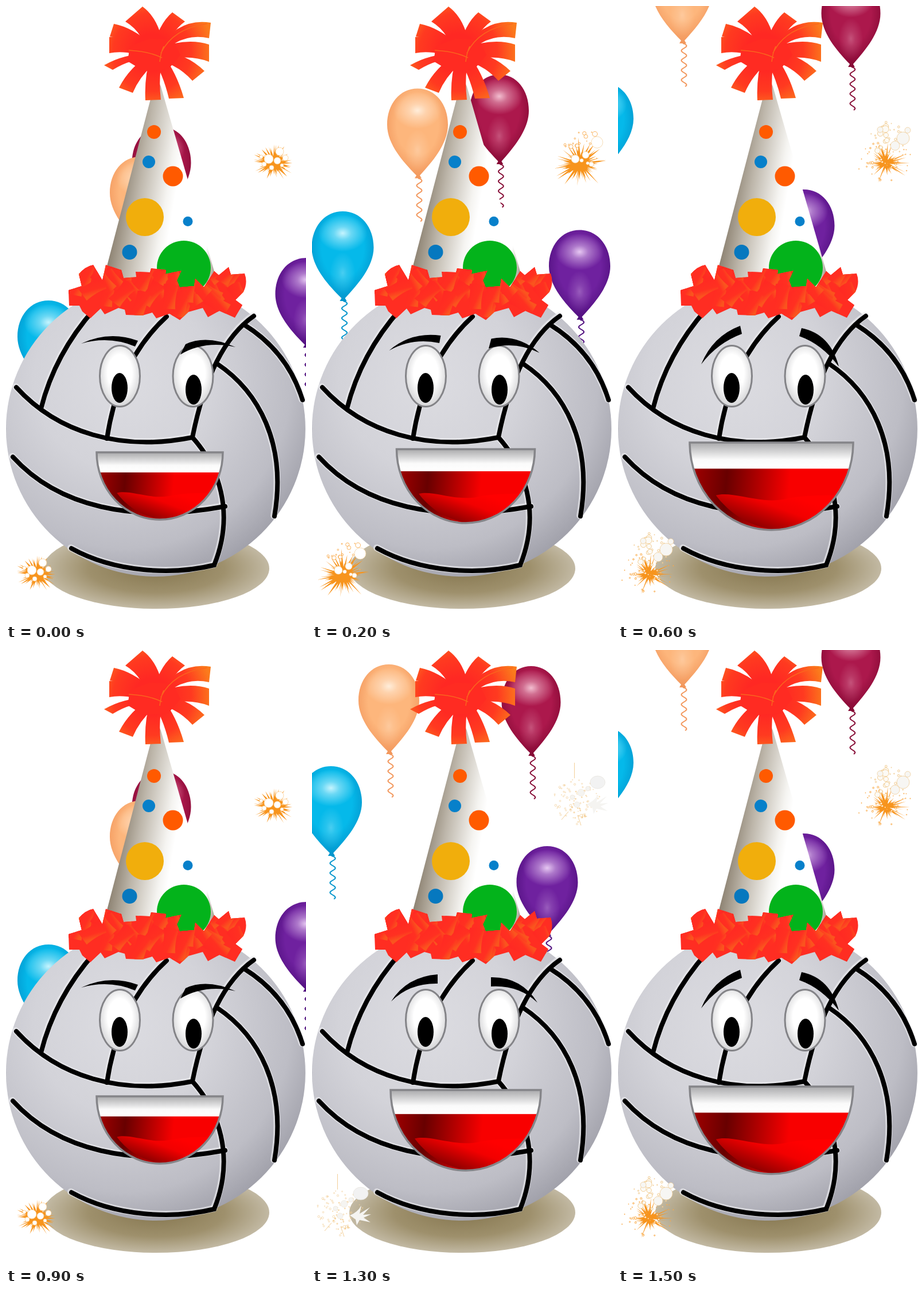
Write an HTML page that moves like this. It is 523 px wide and 1071 px high and loops after 1800 ms.

```html
<!DOCTYPE html>
<html lang="en">
<head>
<meta charset="utf-8">
<title>Party volleyball</title>
<style>
html, body { margin: 0; width: 100%; height: 100%; overflow: hidden; background: #fff; }
svg { display: block; width: 100%; height: 100%; }
</style>
</head>
<body>
<svg id="stage" viewBox="0 0 523 1071" preserveAspectRatio="none">
  <defs>
    <radialGradient id="ball" gradientUnits="userSpaceOnUse" cx="205" cy="650" r="390">
      <stop offset="0" stop-color="#dcdce1"/><stop offset=".4" stop-color="#d3d3d9"/>
      <stop offset=".75" stop-color="#bdbdc5"/><stop offset="1" stop-color="#95959f"/>
    </radialGradient>
    <radialGradient id="shade">
      <stop offset="0" stop-color="#85764f"/><stop offset=".6" stop-color="#9e906c"/><stop offset="1" stop-color="#c2b9a3"/>
    </radialGradient>
    <linearGradient id="cone" gradientUnits="userSpaceOnUse" x1="174" y1="430" x2="366" y2="462">
      <stop offset="0" stop-color="#857a69"/><stop offset=".2" stop-color="#bdb6aa"/>
      <stop offset=".45" stop-color="#f5f4f1"/><stop offset=".53" stop-color="#fff"/>
      <stop offset=".88" stop-color="#fff"/><stop offset="1" stop-color="#9c9283"/>
    </linearGradient>
    <radialGradient id="eye" cx=".5" cy=".45" r=".55">
      <stop offset=".55" stop-color="#fff"/><stop offset="1" stop-color="#d4d4d6"/>
    </radialGradient>
    <radialGradient id="pom" gradientUnits="userSpaceOnUse" cx="255" cy="80" r="105">
      <stop offset=".3" stop-color="#ff2823"/><stop offset=".65" stop-color="#ff3a20"/><stop offset="1" stop-color="#fb7b1c"/>
    </radialGradient>
    <linearGradient id="scrap" x1="0" y1="0" x2="1" y2=".5">
      <stop offset="0" stop-color="#ff2823"/><stop offset=".7" stop-color="#ff3021"/><stop offset="1" stop-color="#fa541e"/>
    </linearGradient>
    <linearGradient id="teeth" x1="0" y1="0" x2="0" y2="1">
      <stop offset="0" stop-color="#a9a9ab"/><stop offset=".65" stop-color="#fafafa"/><stop offset="1" stop-color="#fff"/>
    </linearGradient>
    <linearGradient id="throat" gradientUnits="userSpaceOnUse" x1="5" y1="60" x2="175" y2="75">
      <stop offset="0" stop-color="#a00000"/><stop offset=".35" stop-color="#680000"/><stop offset="1" stop-color="#f80000"/>
    </linearGradient>
    <linearGradient id="tongue" gradientUnits="userSpaceOnUse" x1="170" y1="90" x2="145" y2="156">
      <stop offset="0" stop-color="#ff0000"/><stop offset=".4" stop-color="#f20000"/><stop offset="1" stop-color="#920000"/>
    </linearGradient>
    <clipPath id="lips"><path d="M0 0H287A143.5 154 0 0 1 0 0Z"/></clipPath>
    <clipPath id="fringeClip"><path id="fringeShape"/></clipPath>
  </defs>
  <ellipse cx="262" cy="978" rx="197" ry="70" fill="url(#shade)"/>
  <g id="balloons"></g>
  <ellipse cx="261" cy="735" rx="261" ry="257" fill="url(#ball)"/>
  <g id="seams" fill="none" stroke-linecap="round"></g>
  <path d="M259 135Q265 128 270 140L367 475Q270 520 170 475Z" fill="url(#cone)"/>
  <g id="dots"></g>
  <g id="fringe" clip-path="url(#fringeClip)"></g>
  <g id="pompom" fill="url(#pom)"></g>
  <g id="eyes"></g>
  <path id="browL"/><path id="browR"/>
  <g id="mouth">
    <g clip-path="url(#lips)">
      <rect width="287" height="154" fill="url(#throat)"/>
      <path d="M46 93C75 85 120 108 165 100C205 91 240 94 287 92V154H150C105 148 70 125 46 93Z" fill="url(#tongue)"/>
      <rect width="287" height="46" fill="url(#teeth)"/>
    </g>
    <path d="M0 0H287A143.5 154 0 0 1 0 0Z" fill="none" stroke="#858589" stroke-width="3.5" vector-effect="non-scaling-stroke"/>
  </g>
  <g id="bursts"></g>
</svg>
<script>
const $ = id => document.getElementById(id);

function add(parent, tag, attrs) {
  const el = document.createElementNS('http://www.w3.org/2000/svg', tag);
  for (const k in attrs) el.setAttribute(k, attrs[k]);
  parent.appendChild(el);
  return el;
}

function random(seed) {
  return () => {
    seed = (seed * 16807) % 2147483647;
    return seed / 2147483647;
  };
}

// Four poses; the second lies halfway between the first and the third.
const poses = (a, c, d) => [a, a.map((v, i) => (v + c[i]) / 2), c, d];

function gradient(id, attrs, stops) {
  const g = add(document.querySelector('defs'), 'radialGradient', { id, ...attrs });
  for (const [offset, color, opacity = 1] of stops)
    add(g, 'stop', { offset, 'stop-color': color, 'stop-opacity': opacity });
}

// Balloons: local origin is the top centre
const bag = 'M0 0C31 0 53 27 53 63C53 96 26 127 4 151L7 156H-5L-2 151C-26 127 -53 96 -53 63C-53 27 -31 0 0 0Z';
let curl = 'M1 156';
for (let y = 157; y <= 231; y++)
  curl += `L${(3 + 4.5 * Math.sin((y - 156) / 2.7)).toFixed(1)} ${y}`;

function balloon(name, light, mid, edge, width, places) {
  gradient(name, { cx: .5, cy: .4, r: .62 }, [[0, mid], [.55, mid], [.95, edge], [1, edge]]);
  gradient(name + 'Shine', {}, [[0, light, .95], [.35, light, .5], [1, light, 0]]);
  const g = add($('balloons'), 'g', {});
  const body = add(g, 'g', { transform: `scale(${width / 106} 1)` });
  add(body, 'path', { d: curl, fill: 'none', stroke: edge, 'stroke-width': 2 });
  add(body, 'path', { d: bag, fill: `url(#${name})` });
  const shine = `url(#${name}Shine)`;
  add(body, 'ellipse', { cx: 0, cy: 38, rx: 42, ry: 32, fill: shine });
  add(body, 'ellipse', { cx: 0, cy: 107, rx: 22, ry: 36, fill: shine, opacity: .35 });
  return { g, places };
}

const balloons = [
  balloon('crimson', '#f6c6d6', '#ac184c', '#850934', 103, poses([271, 210], [382, 28], [406, -50])),
  balloon('peach', '#fff0df', '#fdb67c', '#f2975c', 106, poses([234, 262], [134, 25], [112, -91])),
  balloon('sky', '#d0f7ff', '#05b9ea', '#0295cc', 108, poses([74, 512], [33, 202], [-27, 133])),
  balloon('violet', '#ecd0f6', '#6f219f', '#500f7e', 107, poses([523, 438], [410, 341], [324, 319]))
];

// Ball seams
const seams = [
  'M154 527Q85 605 61 700',
  'M18 663C90 742 200 775 325 750',
  'M280 540C225 590 190 660 176 752',
  'M432 539C380 575 345 650 325 750',
  'M415 554C465 585 500 630 517 685',
  'M368 622C440 670 490 760 468 887',
  'M325 750C370 800 400 880 363 972',
  'M12 784C90 870 220 900 382 870',
  'M114 943C190 985 290 990 363 972'
];
for (const d of seams)
  add($('seams'), 'path', { d, stroke: '#ebebef', 'stroke-width': 12, opacity: .65, transform: 'translate(-1 -1)' });
for (const d of seams) add($('seams'), 'path', { d, stroke: '#000', 'stroke-width': 8 });

// Hat dots
for (const [cx, cy, r, fill] of [
  [258, 219, 12, '#ff5a00'], [249, 271, 11, '#0780ca'], [291, 296, 17.5, '#ff5a00'],
  [242, 367, 33, '#f1ae0c'], [317, 374.5, 8.5, '#0780ca'], [215.5, 428, 13, '#0678bf'],
  [310, 455, 47, '#03b31b']
]) add($('dots'), 'circle', { cx, cy, r, fill });

// Fringe: jagged outline filled with overlapping scraps
$('fringeShape').setAttribute('d', `M109 494L132 487L127 466Q138 453 152 450L168 477L174 450L201 459L205 473
L227 471L226 462L251 463L253 456L279 459L278 466L306 460L298 477L303 489L328 487L330 474L345 489
L363 461L371 468L388 454L392 467L416 465Q422 481 414 497L400 511L412 520L399 542L372 530L352 541
L343 525L318 532L303 546L285 535L262 543L255 533L238 538L209 537L207 528L196 525L172 536L165 526
L147 543L133 531L128 521L110 521Z`);
add($('fringe'), 'rect', { x: 105, y: 445, width: 320, height: 105, fill: '#ff2d22' });
const rnd = random(77);
for (let i = 0; i < 36; i++) {
  const x = 112 + (i * 83) % 300, y = 462 + rnd() * 58;
  add($('fringe'), 'path', {
    d: 'M-13 -21Q0 -26 13 -20Q9 0 13 20L-12 22Q-8 0 -13 -21Z', fill: 'url(#scrap)',
    transform: `translate(${x} ${y}) rotate(${rnd() * 120 - 60})`
  });
}

// Pompom ribbons: two outer corners and the bend point
for (const [x1, y1, x2, y2, bx, by] of [
  [208, 27, 238, 1, 255, 35], [290, 11, 312, 27, 276, 38], [180, 82, 180, 54, 215, 62],
  [181, 53, 188, 31, 222, 48], [354, 97, 354, 67, 315, 68], [325, 130, 346, 113, 305, 90],
  [310, 160, 284, 161, 285, 115], [270, 163, 243, 164, 253, 122], [221, 151, 197, 142, 226, 110],
  [186, 111, 171, 103, 215, 85], [354, 56, 357, 29, 300, 32]
]) {
  const dx = x2 - x1, dy = y2 - y1;
  const side = s => `${bx + dx * s} ${by + dy * s}`;
  const base = s => `${263 + dx * s} ${86 + dy * s}`;
  add($('pompom'), 'path', {
    d: `M${base(-.4)}Q${side(-.45)} ${x1} ${y1}L${x2} ${y2}Q${side(.45)} ${base(.4)}Z`
  });
}
add($('pompom'), 'path', { d: 'M216 70L250 57L290 58L304 85L283 110L240 113L212 96Z', fill: '#ff2b22' });
add($('pompom'), 'path', { d: 'M270 82Q291 39 350 31M268 97Q270 80 275 70M214 77Q250 79 272 90', fill: 'none', stroke: '#fa651e', 'stroke-width': 1.5 });

// Eyes
for (const [x, px, py] of [[198.5, 198, 664], [326, 327, 667]]) {
  add($('eyes'), 'ellipse', { cx: x, cy: 643.5, rx: 35, ry: 53, fill: 'url(#eye)', stroke: '#838387', 'stroke-width': 3 });
  add($('eyes'), 'ellipse', { cx: px, cy: py, rx: 14, ry: 26 });
}

// Brows: tip, outer bend, two end corners, inner bend
const browL = poses(
  [131, 587, 180, 564, 230, 582, 225, 592, 180, 573],
  [138, 611, 165, 568, 219, 564, 219, 580, 170, 579],
  [145, 623, 165, 574, 213, 556, 216, 570, 173, 586]);
const browR = poses(
  [400, 593, 350, 571, 313, 588, 304, 606, 346, 581],
  [393, 613, 365, 568, 312, 569, 312, 585, 360, 582],
  [385, 627, 370, 570, 320, 560, 316, 574, 356, 588]);
const browPath = p =>
  `M${p[0]} ${p[1]}Q${p[2]} ${p[3]} ${p[4]} ${p[5]}L${p[6]} ${p[7]}Q${p[8]} ${p[9]} ${p[0]} ${p[1]}Z`;

// Mouth: left, top, width, height
const mouth = poses([158, 776, 220, 117], [137, 765, 262, 140], [125, 759, 285, 152]);

// Fireworks, drawn around their own centre
const orange = '#f7941d', pale = '#f3cf98';

function spikes(g, rand, count, near, far, width, lift) {
  let d = '';
  for (let i = 0; i < count; i++) {
    const a = (i + rand() * .8) / count * Math.PI * 2;
    const len = near + (far - near) * rand();
    const c = Math.cos(a), s = Math.sin(a), w = width * (.5 + rand());
    d += `M${s * w} ${lift - c * w}L${c * len} ${lift + s * len * .9}L${-s * w} ${lift + c * w}Z`;
  }
  add(g, 'path', { d, fill: orange });
}

function rings(g, rand, count, cx, cy, rx, ry, size, stroke, fill) {
  for (let i = 0; i < count; i++) {
    const a = rand() * Math.PI * 2, m = Math.sqrt(rand());
    add(g, 'circle', {
      cx: cx + Math.cos(a) * m * rx, cy: cy + Math.sin(a) * m * ry,
      r: .5 + size * rand() * rand(), fill, stroke, 'stroke-width': .7
    });
  }
}

function blobs(g, list, fill, stroke) {
  for (const [cx, cy, r] of list) add(g, 'circle', { cx, cy, r, fill, stroke, 'stroke-width': .7 });
}

const drawBurst = [
  (g, r) => {
    spikes(g, r, 46, 17, 39, 2.6, 2);
    blobs(g, [[-9, -5, 8], [10, -18, 7], [20, -7, 5], [-17, 4, 4], [6, -2, 6], [-4, 10, 4], [14, 6, 3], [-22, -9, 3]], '#fff', '#fbc680');
  },
  (g, r) => {
    spikes(g, r, 54, 16, 51, 2.4, 3);
    rings(g, r, 26, 6, -26, 34, 30, 7, orange, '#fff');
    blobs(g, [[30, -34, 10], [-8, -5, 7], [10, -12, 6], [20, 4, 4]], '#fff', pale);
  },
  (g, r) => {
    rings(g, r, 70, -6, -8, 41, 40, 2.6, pale, 'none');
    rings(g, r, 24, 0, 0, 20, 30, 1, '#efb865', 'none');
    add(g, 'path', { d: 'M-9.5 -75V-48M-32 24L-20 10M2 34L-4 16', stroke: pale, 'stroke-width': 1, fill: 'none' });
    add(g, 'path', { d: 'M12 -3Q25 -8 32 -20L29 -6L47 -17L35 -4L49 -5L36 1L48 9L29 5L24 14L22 4Z', fill: '#f5f4f1' });
    add(g, 'ellipse', { cx: 31, cy: -41, rx: 13, ry: 11, fill: '#f2f2f2', stroke: '#e6e3dc', 'stroke-width': .7 });
    blobs(g, [[2, -23, 6], [14, -30, 4], [-13, -15, 4], [-5, -2, 5]], '#f5f4f1', '#ece6da');
  },
  (g, r) => {
    spikes(g, r, 48, 8, 43, 1.5, 2);
    rings(g, r, 46, -2, 0, 48, 36, 2.6, orange, '#fff4e2');
    rings(g, r, 42, 8, -42, 35, 31, 6, '#ecb96b', '#fcfaf5');
    blobs(g, [[30, -41, 11], [16, -28, 8], [-10, -56, 5], [38, -55, 5]], '#f7f6f3', '#ecc88f');
  }
];

const bursts = drawBurst.map((draw, i) => {
  const g = add($('bursts'), 'g', { display: 'none' });
  for (const [x, y] of [[54, 986], [467, 271]])
    draw(add(g, 'g', { transform: `translate(${x} ${y})` }), random(431 + i * 97));
  return g;
});

function setPose(k) {
  for (const { g, places } of balloons) g.setAttribute('transform', `translate(${places[k]})`);
  $('browL').setAttribute('d', browPath(browL[k]));
  $('browR').setAttribute('d', browPath(browR[k]));
  const [x, y, w, h] = mouth[k];
  $('mouth').setAttribute('transform', `translate(${x} ${y}) scale(${w / 287} ${h / 154})`);
  bursts.forEach((g, i) => g.setAttribute('display', i === k ? 'inline' : 'none'));
}

// The 1800 ms loop holds two identical rounds.
const start = performance.now();
let shown = -1;
function tick() {
  const t = (performance.now() - start) % 900;
  const k = Math.min(3, Math.floor(t / 200));
  if (k !== shown) setPose(shown = k);
  requestAnimationFrame(tick);
}
tick();
</script>
</body>
</html>
```
